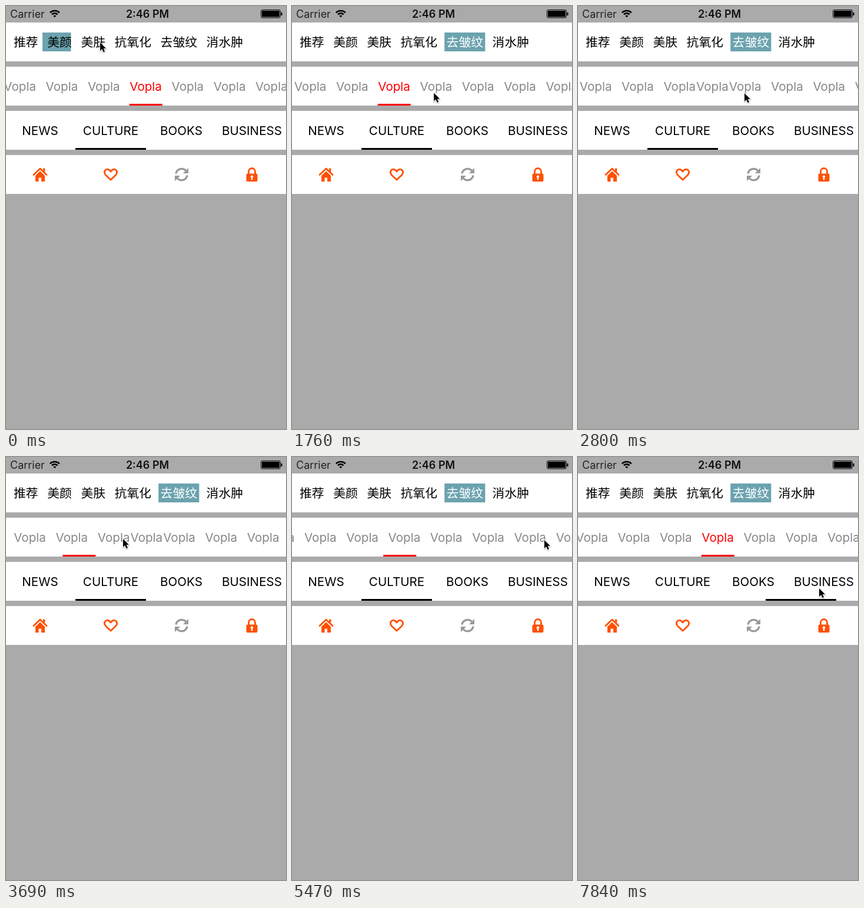
Write an HTML page with a canvas that moves like this. It is 476 by 718 pixels and loops after 7990 ms.

```html
<!DOCTYPE html>
<html lang="zh-CN">
<head>
<meta charset="utf-8">
<title>Tab bars</title>
<style>
html, body { margin: 0; width: 100%; height: 100%; overflow: hidden; background: #aaa; }
canvas { display: block; }
</style>
</head>
<body>
<canvas id="stage" width="476" height="718"></canvas>
<script>
const ctx = document.getElementById('stage').getContext('2d');
const LOOP = 7990;
const LATIN = 'Inter, Roboto, sans-serif';
const CJK = '"Noto Sans CJK SC", "Noto Sans CJK", sans-serif';
const ORANGE = '#ff5000';

const clamp01 = p => Math.max(0, Math.min(1, p));
const ease = p => p < .5 ? 2 * p * p : 1 - 2 * (1 - p) ** 2;
const lerp = (a, b, p) => a + (b - a) * p;

// Each move is [start, duration, destination].
const follow = (start, moves, t) => moves.reduce(
  (v, [at, span, to]) => lerp(v, to, ease(clamp01((t - at) / span))), start);

function rect(x, y, w, h, color) {
  ctx.fillStyle = color;
  ctx.fillRect(x, y, w, h);
}

function text(str, x, y, font, color, align = 'center') {
  ctx.font = font;
  ctx.fillStyle = color;
  ctx.textAlign = align;
  ctx.fillText(str, x, y);
}

function stroke(path, color, width) {
  ctx.strokeStyle = color;
  ctx.lineWidth = width;
  ctx.stroke(path);
}

function fill(path, color, rule) {
  ctx.fillStyle = color;
  ctx.fill(path, rule);
}

// Filter row: the highlight slides between neighbours.
const filters = [];
['推荐', '美颜', '美肤', '抗氧化', '去皱纹', '消水肿'].reduce((x, label) => {
  const w = label.length * 20.8;
  filters.push({ label, x, w });
  return x + w + 15.6;
}, 13);
const filterMoves = [[-318, 400, 1], [85, 400, 2], [480, 400, 3], [980, 400, 4]];

function drawFilters(t) {
  const pos = follow(0, filterMoves, t);
  const from = filters[Math.floor(pos)], to = filters[Math.ceil(pos)], p = pos % 1;
  rect(lerp(from.x, to.x, p) - 3.4, 45, lerp(from.w, to.w, p) + 6.8, 32, '#6ba3af');
  filters.forEach((f, i) =>
    text(f.label, f.x, 69, '20.8px ' + CJK, i === pos ? '#fff' : '#000', 'left'));
}

// Scrolling row: three items around index 5 touch each other.
const REST = 209.7, ITEM = 55.7, GAP = 15.6;
const itemX = i => i * (ITEM + GAP) - GAP * (i > 5 ? 2 : i > 4 ? 1 : 0);
const picks = [[3454, 5, 212], [4350, 8, REST], [5242, 11, REST], [6231, 13, REST]];
const lineMoves = picks.map(([at, i]) => [at, 400, itemX(i)]);
const scrollMoves = [[1500, 860, -140.3],
  ...picks.map(([at, i, x]) => [at, 300, x - itemX(i)])];

function drawScroller(t) {
  const scroll = follow(REST, scrollMoves, t);
  const line = follow(0, lineMoves, t);
  for (let i = -5; i < 20; i++) {
    const selected = Math.abs(itemX(i) - line) < .01;
    text('Vopla', scroll + itemX(i) + ITEM / 2, 144, '20.6px ' + LATIN, selected ? '#f00' : '#888');
  }
  rect(scroll + line, 166, 56, 3, '#f00');
}

function drawSections(t) {
  ['NEWS', 'CULTURE', 'BOOKS', 'BUSINESS'].forEach((label, i) =>
    text(label, 58 + i * 120, 219, '20.6px ' + LATIN, '#000'));
  rect(follow(118, [[7554, 400, 358]], t), 241, 120, 3, '#000');
}

const roof = new Path2D('M47 286.5 L58 276 L69 286.5');
const house = new Path2D('M50 288 L58 280.3 L66 288 V298 H60 V291.5 H55.5 V298 H50 Z M63 275.5 H66.3 V282 L63 279 Z');
const heart = new Path2D('M178 295 L169.5 287 C164.5 281 170 275 175 278 Q177 279.3 178 281 Q179 279.3 181 278 C186 275 191.5 281 186.5 287 Z');
const arrows = new Path2D('M310 275 V284 H301 Z M287 297 V288 H296 Z');
const lock = new Path2D('M410.5 284.5 H425.5 Q427.5 284.5 427.5 286.5 V296 Q427.5 298 425.5 298 H410.5 Q408.5 298 408.5 296 V286.5 Q408.5 284.5 410.5 284.5 Z M416.8 291.5 V295 H419.2 V291.5 A2.2 2.2 0 1 0 416.8 291.5 Z');
const shackle = new Path2D('M412.5 286 V281 A5.5 5.5 0 0 1 423.5 281 V286');

function drawIcons() {
  ctx.lineCap = ctx.lineJoin = 'round';
  stroke(roof, ORANGE, 2.8);
  fill(house, ORANGE);
  stroke(heart, ORANGE, 2.8);
  ctx.lineCap = 'butt';
  for (const turn of [0, Math.PI]) {
    const arc = new Path2D();
    arc.arc(298.5, 286, 9.7, turn + Math.PI * 1.05, turn + Math.PI * 1.78);
    stroke(arc, '#999', 3.2);
  }
  fill(arrows, '#999');
  fill(lock, ORANGE, 'evenodd');
  stroke(shackle, ORANGE, 2.8);
}

function drawStatus() {
  text('Carrier', 7, 20, '18px ' + LATIN, '#222', 'left');
  text('2:46 PM', 240.5, 20, '600 18px ' + LATIN, '#111');
  for (const [r, width] of [[1.8, 3.6], [6.9, 2.6], [11.3, 2.6]]) {
    const arc = new Path2D();
    arc.arc(82.8, 19.3, r, -Math.PI * .75, -Math.PI * .25);
    stroke(arc, '#000', width);
  }
  const shell = new Path2D();
  shell.roundRect(433.5, 6.5, 33, 13.5, 2.5);
  stroke(shell, '#000', 1);
  rect(435, 8, 30, 10.5, '#000');
  rect(467.5, 11, 2, 5, '#000');
}

const pointer = new Path2D('M0 0 V14 L3.2 11 L5.6 16.2 L8 15.1 L5.7 10.1 H10 Z');
// [time, x, y]
const pointerStops = [
  [0, 160, 62], [150, 160, 62], [420, 208, 62], [520, 208, 62], [820, 283, 60],
  [1200, 283, 60], [1500, 430, 140], [1900, 180, 150], [2250, 367, 157], [2400, 367, 157],
  [3200, 199, 139], [3860, 199, 139], [4250, 429, 141], [5620, 429, 141],
  [6100, 374, 141], [6510, 374, 141], [6800, 290, 222], [7400, 410, 223], [LOOP, 410, 223]
];

function drawPointer(t) {
  const next = pointerStops.findIndex(s => s[0] > t);
  const [t0, x0, y0] = pointerStops[next - 1], [t1, x1, y1] = pointerStops[next];
  const p = ease((t - t0) / (t1 - t0));
  ctx.save();
  ctx.translate(lerp(x0, x1, p), lerp(y0, y1, p));
  ctx.lineJoin = 'miter';
  ctx.shadowColor = 'rgba(0,0,0,.35)';
  ctx.shadowBlur = 2;
  ctx.shadowOffsetY = 1;
  stroke(pointer, '#fff', 1.8);
  ctx.shadowColor = 'transparent';
  fill(pointer, '#000');
  ctx.restore();
}

function draw(now) {
  const t = now % LOOP;
  rect(0, 0, 476, 718, '#aaa');
  for (let y = 28; y < 300; y += 75) rect(0, y, 476, 66, '#fff');
  drawStatus();
  drawFilters(t);
  drawScroller(t);
  drawSections(t);
  drawIcons();
  drawPointer(t);
}

let began;
function tick(now) {
  began ??= now;
  draw(now - began);
  requestAnimationFrame(tick);
}
requestAnimationFrame(tick);
</script>
</body>
</html>
```
